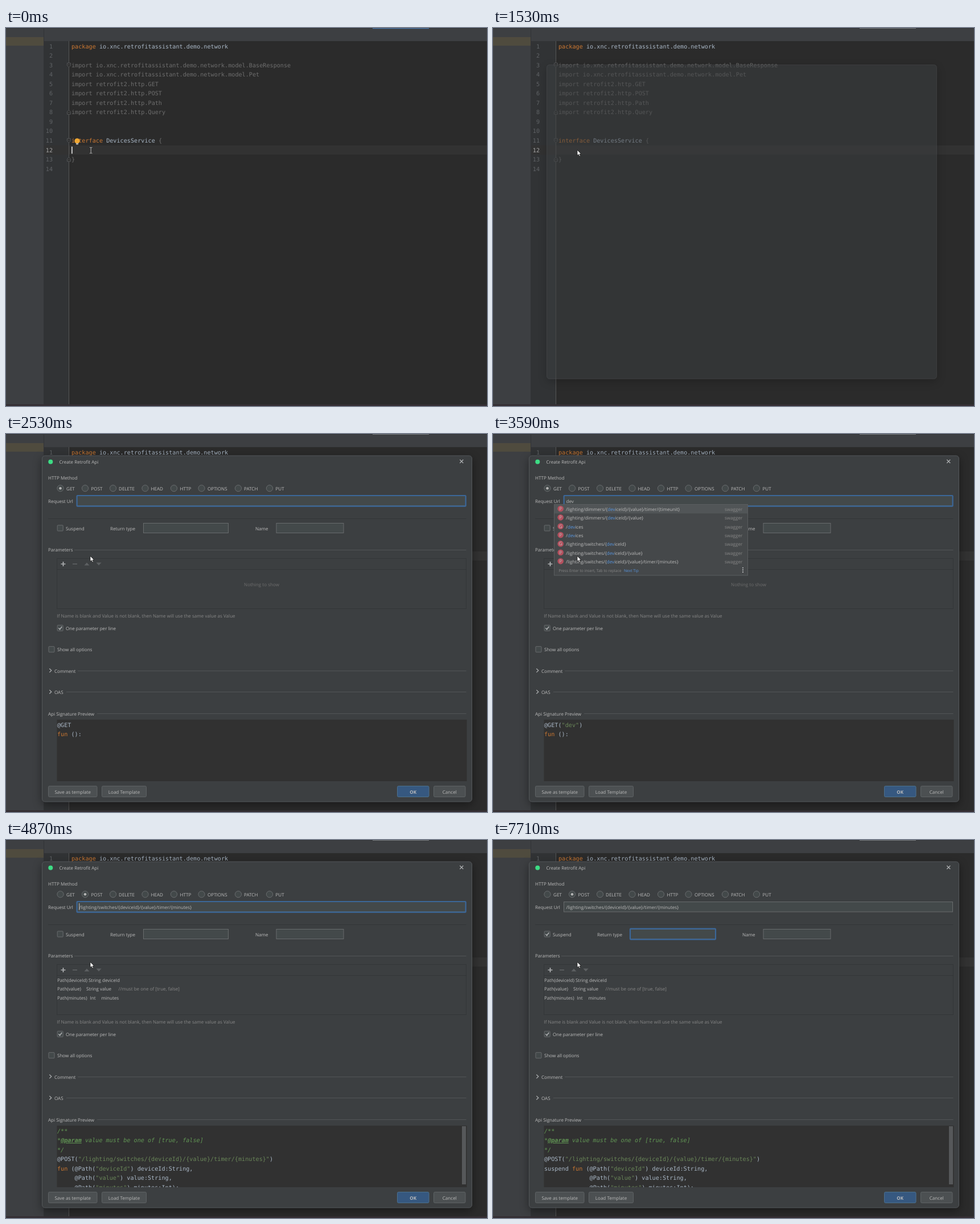
These frames come from a looping animation (845 by 663 pixels, 8000 ms). An HTML page:

```html
<!DOCTYPE html>
<html lang="en">
<head>
<meta charset="utf-8">
<title>API dialog</title>
<style>
  html, body { margin: 0; width: 100%; height: 100%; overflow: hidden; background: #2b2b2b; }
  svg { display: block; width: 845px; height: 663px; }
  text { white-space: pre; text-rendering: geometricPrecision; }
  .ui { font: 8.07px "Open Sans", "Noto Sans", sans-serif; fill: #bbb; }
  .code { font: 10.17px "DejaVu Sans Mono", "Noto Sans Mono", monospace; fill: #a9b7c6; }
  .tip { font-size: 6.7px; }
  .mid { text-anchor: middle; }
  .end { text-anchor: end; }
  .bold { font-weight: 700; }
  .dim { fill: #6e6e6e; }
  .soft { fill: #878787; }
  .num { fill: #606366; }
  .cur { fill: #a4a3a3; }
  .k { fill: #cc7832; }
  .s { fill: #6a8759; }
  .hit { fill: #5896e0; }
  .doc { fill: #629755; font-style: italic; }
  .tag { font-weight: 700; text-decoration: underline; }
  .alt .m { text-decoration: underline; }
  .ln { stroke: #515456; fill: none; }
  .dark { stroke: #333638; fill: none; }
  .box { fill: #43494a; stroke: #686b6d; }
  .ring { fill: none; stroke: #3b6799; stroke-width: 2.2; }
  .ico { fill: none; stroke: #afb1b3; stroke-width: 1.2; }
  .fold { fill: #2b2b2b; stroke: #5a5c5e; stroke-width: .9; }
  .btn { fill: #4c5052; stroke: #5e6264; }
  .ok { fill: #365880; stroke: #4c708c; }
  #dialog { transform-origin: 398px 325px; }
  #frame { fill: #3c3f41; stroke: #53575a; filter: drop-shadow(0 5px 8px rgba(0,0,0,.4)); }
</style>
</head>
<body>
<svg id="stage" viewBox="0 0 845 663"></svg>
<script>
const LOOP = 8000;
const URL_TEXT = '/lighting/switches/{deviceId}/{value}/timer/{minutes}';
const ROUTES = [
  ['P', '/lighting/dimmers/{deviceId}/{value}/timer/{timeunit}'],
  ['P', '/lighting/dimmers/{deviceId}/{value}'],
  ['G', '/devices'],
  ['P', '/devices'],
  ['G', '/lighting/switches/{deviceId}'],
  ['P', '/lighting/switches/{deviceId}/{value}'],
  ['P', URL_TEXT]
];
const TYPING = [[0, ''], [2730, 'd'], [2860, 'de'], [2990, 'dev'], [4260, 'devm'], [4330, 'devmi'], [4730, URL_TEXT]];
// time, scale, opacity
const OPENING = [[0, .88, 0], [1460, .885, .12], [1530, .907, .5], [1600, .965, .9], [1670, .992, 1], [1740, .998, 1], [1820, 1, 1]];

const rect = (x, y, w, h, attrs) => `<rect x="${x}" y="${y}" width="${w}" height="${h}" ${attrs}/>`;
const path = (d, cls, attrs = '') => `<path d="${d}" class="${cls}" ${attrs}/>`;
const hline = (x, y, cls = 'ln') => path(`M${x} ${y}H808.5`, cls);
const on = (spans, inner) => `<g data-on="${spans}">${inner}</g>`;
// x, vertical centre, text; "_" marks the mnemonic letter
const ui = (x, y, s, cls = '') =>
  `<text x="${x}" y="${y + 3}" class="ui ${cls}">${s.replace(/_(.)/, '<tspan class=m>$1</tspan>')}</text>`;
const paint = s => s.replace(/\b(package|interface|fun)\b/g, '<tspan class=k>$1</tspan>')
                    .replace(/"[^"]*"/g, '<tspan class=s>$&</tspan>');
const code = (x, y, s, cls = '') => `<text x="${x}" y="${y + 3.6}" class="code ${cls}">${paint(s)}</text>`;

const lineY = n => 32 + (n - 1) * 16.54;

function editor() {
  const pkg = 'io.xnc.retrofitassistant.demo.network';
  const src = {
    1: 'package ' + pkg,
    3: `import ${pkg}.model.BaseResponse`,
    4: `import ${pkg}.model.Pet`,
    5: 'import retrofit2.http.GET',
    6: 'import retrofit2.http.POST',
    7: 'import retrofit2.http.Path',
    8: 'import retrofit2.http.Query',
    11: 'interface DevicesService <tspan class=dim>{</tspan>',
    13: '}'
  };
  let out = rect(0, 0, 845, 663, 'fill="#2b2b2b"')
    + rect(67, 23, 43, 640, 'fill="#313335"')
    + rect(67, 206, 778, 16, 'fill="#323232"')
    + rect(0, 0, 845, 23, 'fill="#3d3f42"')
    + rect(0, 0, 66, 663, 'fill="#3d3f42"')
    + rect(0, 0, 845, 1, 'fill="#323437"')
    + rect(0, 16, 66, 15, 'fill="#4f4b3e"')
    + rect(66, 0, 1, 663, 'fill="#323437"')
    + rect(0, 660, 845, 3, 'fill="#352f34"')
    + rect(110, 23, 1, 637, 'fill="#555"')
    + rect(644, 0, 99, 1, 'fill="#777a7d"')
    + on('0-1000', rect(644, 0, 99, 1.2, 'fill="#4a78ad"'));
  for (let n = 1; n <= 14; n++) {
    out += code(82, lineY(n), String(n), 'end ' + (n === 12 ? 'cur' : 'num'));
    if (src[n]) out += code(115, lineY(n), src[n], n === 1 || n === 11 ? '' : 'dim');
  }
  for (const [n, dir] of [[3, 1], [8, -1], [11, 1], [13, -1]])
    out += path('M-3-3.5h6v4.5l-3 2.5l-3-2.5zM-1.5-.5h3', 'fold', `transform="translate(110.5 ${lineY(n)}) scale(1 ${dir})"`);
  return out
    + on('0-260,790-1000', rect(115, 208, 1.8, 12.5, 'fill="#d0d0d0"'))
    + on('0-1000',
        '<circle cx="125" cy="198" r="4.6" fill="#f0a732"/>' + rect(123, 202, 4, 2.6, 'fill="#a9abad"')
        + path('M147 209.5h1.5l.7.7l.7-.7h1.5M149.2 210v9M147 219.7h1.5l.7-.7l.7.7h1.5', '', 'fill="none" stroke="#c8c8c8" stroke-width=".9"'));
}

const checkbox = (x, y) => rect(x - 5, y - 5, 10, 10, 'class="box" rx="1"');
const tick = (x, y) => path(`M${x - 2.8} ${y}l2.2 2.5l3.6-5`, 'ico', 'style="stroke-width:1.5"');

function radios() {
  const items = [[95.5, 106, '_GET'], [139, 149.5, '_POST'], [188, 198, 'DELETE'], [244.5, 254.5, 'HEAD'],
    [295, 305.5, 'HTTP'], [343.5, 354, 'OPTIONS'], [408, 418, 'PATCH'], [463, 473.5, 'PUT']];
  const dot = x => `<circle cx="${x}" cy="95.2" r="2.3" fill="#b4b4b4"/>`;
  return items.map(([cx, x, s]) => `<circle cx="${cx}" cy="95.2" r="5.6" class="box"/>` + ui(x, 95.7, s)).join('')
    + on('0-4800', dot(95.5)) + on('4800-8000', dot(139));
}

function button(x, w, s, cls = 'btn', textCls = '') {
  return rect(x, 617.5, w, 19, `class="${cls}" rx="2"`) + ui(x + w / 2, 627.7, s, 'mid ' + textCls);
}

function params() {
  return ui(90, 245.7, 'Path(deviceId) String deviceId')
    + ui(90, 261.2, 'Path(value)') + ui(141, 261.2, 'String value')
    + ui(197.5, 261.2, '//must be one of [true, false]', 'soft')
    + ui(90, 276.7, 'Path(minutes)') + ui(147.5, 276.7, 'Int') + ui(167.5, 276.7, 'minutes');
}

function signature(lead) {
  const y = n => 510 + n * 16.55;
  const indent = 90 + (lead.length + 5) * 6.12;
  return code(90, y(0), '/**', 'doc')
    + code(90, y(1), '*<tspan class=tag>@param</tspan> value must be one of [true, false]', 'doc')
    + code(90, y(2), '*/', 'doc')
    + code(90, y(3), `@POST("${URL_TEXT}")`)
    + code(90, y(4), lead + 'fun (@Path("deviceId") deviceId:String,')
    + code(indent, y(5), '@Path("value") value:String,')
    + code(indent, y(6), '@Path("minutes") minutes:Int):');
}

function popup(rows, match) {
  const step = 15.35, foot = 124 + rows.length * step;
  let out = rect(107.5, 123.5, 340, foot - 107, 'fill="#45484a" stroke="#5a5d5f"')
    + rect(108, 124, 339, step, 'fill="#515557"');
  rows.forEach(([kind, route], i) => {
    const y = 131.7 + i * step;
    out += `<circle cx="118.7" cy="${y - .7}" r="5.3" fill="#b4515f"/>`
      + ui(118.7, y - .7, kind, 'mid')
      + ui(128, y + .3, route.replace(match, '<tspan class=hit>$&</tspan>'))
      + ui(407, y + .3, 'swagger', 'soft');
  });
  out += ui(115.5, foot + 8, 'Press Enter to insert, Tab to replace', 'tip soft')
    + ui(230, foot + 8, 'Next Tip', 'tip hit');
  for (const d of [-3.7, 0, 3.7]) out += `<circle cx="439" cy="${foot + 7 + d}" r="1.1" fill="#b8babc"/>`;
  return out;
}

function dialog() {
  const field = (x, y, w, h) => rect(x, y, w, h, 'class="box"');
  const ring = (x, y, w, h) => rect(x, y, w, h, 'class="ring" rx="1"');
  const content = '<circle cx="78.3" cy="48.7" r="4" fill="#3ddc84"/>'
    + ui(93.5, 49, 'Create Retrofit Api')
    + path('M797.3 45l6 6m0-6l-6 6', 'ico')
    + ui(74, 76.7, 'HTTP Method') + radios()
    + ui(74, 117.8, 'Request Url')
    + field(124.5, 108.5, 683, 17.5) + on('0-6590', ring(124.6, 108, 683, 18.7))
    + '<text id="url" x="128.5" y="121" class="ui"></text>'
    + on('1600-2530,2730-3590,4060-6590', rect(128.3, 111, 1, 12, 'id="caret" fill="#c4c4c4"'))
    + hline(74, 148.5, 'dark')
    + checkbox(95.2, 165) + ui(105, 165.5, 'Suspen_d')
    + on('6590-7250', ring(89.2, 159, 12, 12)) + on('6720-8000', tick(95.2, 165))
    + ui(183, 165.5, 'Return type') + field(241.5, 156.5, 149, 17)
    + on('7250-8000', ring(241, 155.7, 150, 18.6)) + on('7250-7710', rect(245, 159, 1, 12, 'fill="#c4c4c4"'))
    + ui(438, 165.5, 'Name') + field(475, 156.5, 118, 17)
    + ui(74, 203, 'Parameters') + hline(120, 203.5)
    + rect(89.5, 218.5, 719, 88, 'class="dark"') + hline(89.5, 237.5, 'dark')
    + path('M96.5 228h8m-4-4v8', 'ico', 'style="stroke-width:1.7"')
    + path('M117 228h8', '', 'stroke="#626567" stroke-width="1.5"')
    + path('M137.5 230.5h9l-4.5-5zM158.5 225.5h9l-4.5 5z', '', 'fill="#5d6062"')
    + on('0-4800', ui(449, 263.7, 'Nothing to show', 'mid dim')) + on('4800-8000', params())
    + ui(89.5, 319, 'If Name is blank and Value is not blank, then Name will use the same value as Value', 'soft')
    + checkbox(95.2, 340.3) + tick(95.2, 340.3) + ui(105, 341, 'On_e parameter per line')
    + checkbox(80, 377.7) + ui(90, 378.3, 'Show _all options')
    + path('M76.3 411.5l3.5 3.3l-3.5 3.3M76.3 448.9l3.5 3.3l-3.5 3.3', 'ico')
    + ui(85, 415.5, 'Comment') + hline(126, 415.5)
    + ui(85, 453, 'OAS') + hline(106, 452.5)
    + ui(74, 490.5, 'Api Signature Preview') + hline(160, 490.5)
    + rect(89.5, 501, 720, 108, 'fill="#313131"')
    + '<g clip-path="url(#preview)">'
    + on('0-4800', '<text id="get" x="90" y="513.6" class="code"></text>' + code(90, 526.5, 'fun ():'))
    + on('4800-6850', signature('')) + on('6850-8000', signature('suspend ')) + '</g>'
    + on('4800-8000', rect(801, 502, 7, 102, 'fill="#56585a"'))
    + button(74.5, 85.5, '_Save as template') + button(168.5, 78, '_Load Template')
    + button(687.5, 55.5, 'OK', 'ok', 'bold') + button(751.5, 55.5, 'Cancel')
    + on('3120-4260', popup(ROUTES, /dev/)) + on('4260-4730', popup(ROUTES.slice(-1), /dev|mi/g));
  return '<clipPath id="preview">' + rect(89, 501, 721, 108, '') + '</clipPath>'
    + '<g id="dialog">' + rect(63.5, 38, 755, 607, 'id="frame" rx="5"') + on('1600-8000', content) + '</g>';
}

const stage = document.getElementById('stage');
stage.innerHTML = editor() + dialog()
  + on('1000-8000', path('M148 214v9.6l2.2-2l1.6 3.5l1.7-.8l-1.6-3.4h3z', '', 'fill="#fff" stroke="#111" stroke-width=".7"'));

const [box, url, get, caret] = ['dialog', 'url', 'get', 'caret'].map(id => document.getElementById(id));
const timed = [...stage.querySelectorAll('[data-on]')].map(el =>
  ({ el, spans: el.dataset.on.split(',').map(s => s.split('-').map(Number)) }));
const at = (steps, t) => steps.filter(s => s[0] <= t).pop();
let shown = null;

function draw(t) {
  for (const { el, spans } of timed)
    el.style.display = spans.some(([a, b]) => t >= a && t < b) ? '' : 'none';
  const [, scale, opacity] = at(OPENING, t);
  box.style.transform = scale === 1 ? 'none' : `scale(${scale})`;
  box.style.opacity = opacity;
  stage.classList.toggle('alt', t >= 6460 && t < 7050);
  const text = at(TYPING, t)[1];
  if (text !== shown) {
    shown = text;
    url.textContent = text;
    get.innerHTML = paint(text ? `@GET("${text}")` : '@GET');
    const offset = text && text !== URL_TEXT ? url.getComputedTextLength() : 0;
    caret.setAttribute('x', 128.3 + offset);
  }
}

const start = performance.now();
function tick0() {
  draw((performance.now() - start) % LOOP);
  requestAnimationFrame(tick0);
}
tick0();
</script>
</body>
</html>
```
